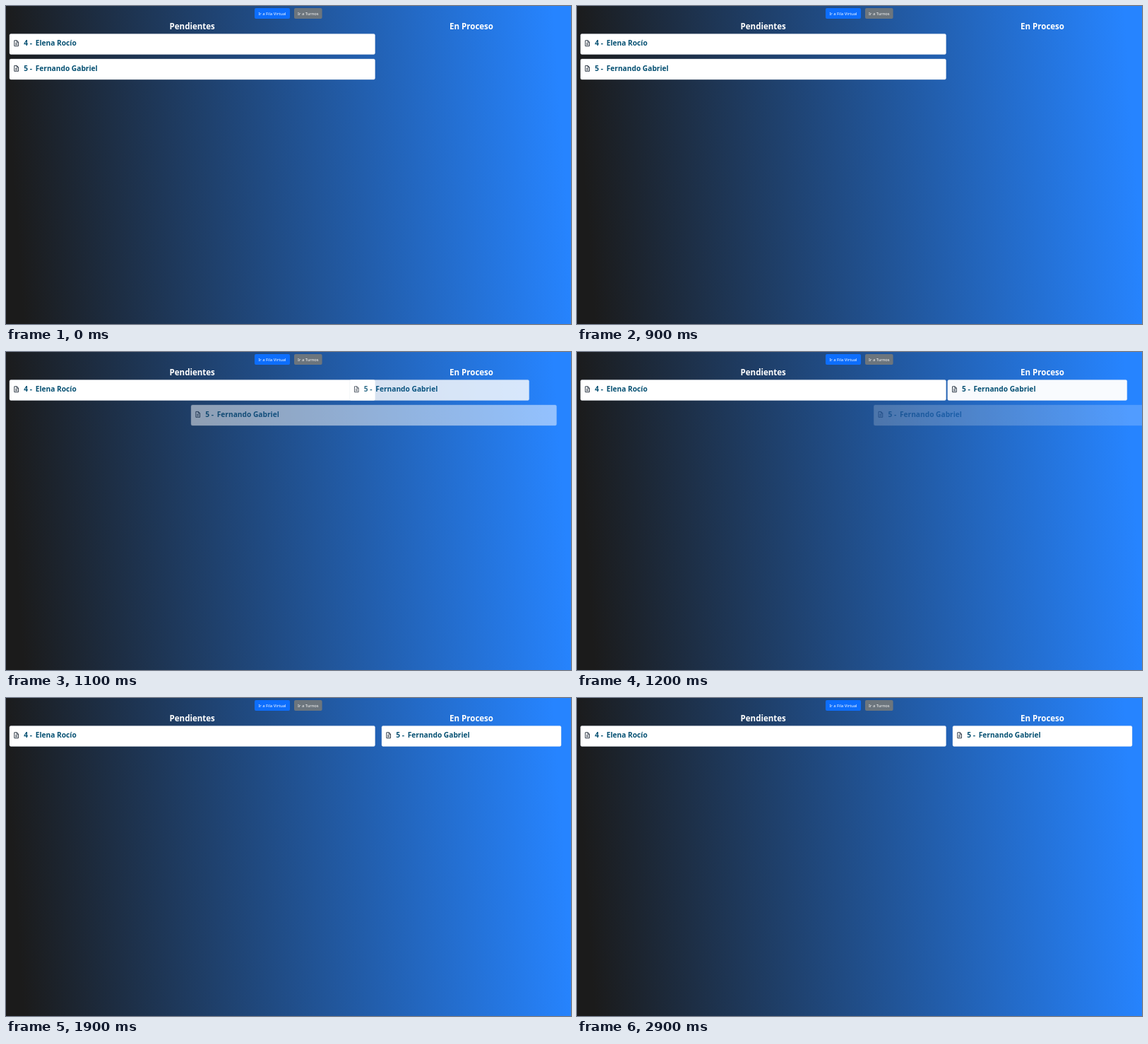
Recreate the animation shown at these times as an HTML page. Size 800 by 450 pixels, loop 3000 ms.

```html
<!DOCTYPE html>
<html lang="es">
<head>
<meta charset="utf-8">
<title>Turnos</title>
<style>
  html, body { margin: 0; width: 100%; height: 100%; overflow: hidden; }
  body { background: linear-gradient(86deg, #1b1b1b 3%, #2684ff 97%); }
  svg { display: block; width: 100%; height: 100%; }
  text { font-family: "Noto Sans", "Open Sans", sans-serif; }
  .head { font-size: 11.5px; font-weight: 600; fill: #fff; text-anchor: middle; }
  .btn { font-size: 5.8px; fill: #fff; text-anchor: middle; }
  .name { font-size: 10.2px; font-weight: 600; fill: #055072; }
  .box { fill: #fff; stroke: #dfe4ea; stroke-width: .4; }
  .icon { fill: none; stroke: #1c2936; stroke-width: .9; stroke-linejoin: round; }
</style>
</head>
<body>
<svg id="stage" viewBox="0 0 800 450"></svg>
<script>
const LOOP = 3000, STEP = 100;
const WIDE = 517.5, NARROW = 254;
const stage = document.getElementById('stage');

const button = (x, w, fill, label) => `
  <rect x="${x}" y="3" width="${w}" height="15" rx="2" fill="${fill}"/>
  <text class="btn" x="${x + w / 2}" y="13.1">${label}</text>`;

const heading = (x, label) => `<text class="head" x="${x}" y="33.3">${label}</text>`;

const card = (id, x, y, w, num, name) => `
  <g id="${id}"><g transform="translate(${x} ${y})">
    <rect class="box" width="${w}" height="29" rx="2"/>
    <path class="icon" d="M6.8 9.4h3.6l2.1 2.1v5.8h-5.7zM10.2 9.4v2.3h2.3M8.2 13.4h2.9M8.2 15.3h2.9"/>
    <text class="name" x="20.2" y="17.1">${num} -<tspan x="36.7">${name}</tspan></text>
  </g></g>`;

stage.innerHTML =
  button(352, 50, '#0d6efd', 'Ir a Fila Virtual') +
  button(408, 39.6, '#6c757d', 'Ir a Turnos') +
  heading(263.7, 'Pendientes') +
  heading(659, 'En Proceso') +
  card('first', 5, 39.4, WIDE, 4, 'Elena Rocío') +
  card('leaving', 5, 75, WIDE, 5, 'Fernando Gabriel') +
  card('entering', 532, 39.4, NARROW, 5, 'Fernando Gabriel');

const leaving = document.getElementById('leaving');
const entering = document.getElementById('entering');

// cubic-bezier(.25, .1, .25, 1), solved by bisection
const bez = (a, b, u) => 3 * a * u * (1 - u) ** 2 + 3 * b * u * u * (1 - u) + u ** 3;
function ease(x) {
  if (x <= 0) return 0;
  if (x >= 1) return 1;
  let lo = 0, hi = 1;
  for (let i = 0; i < 30; i++) {
    const mid = (lo + hi) / 2;
    if (bez(.25, .25, mid) < x) lo = mid; else hi = mid;
  }
  return bez(.1, 1, lo);
}

function pose(el, dx, opacity) {
  el.setAttribute('transform', `translate(${dx.toFixed(2)} 0)`);
  el.setAttribute('opacity', opacity.toFixed(3));
}

function draw(ms) {
  const t = Math.floor((ms % LOOP) / STEP) * STEP;
  const out = ease((t - 960) / 480);
  const into = ease((t - 904) / 377);
  pose(leaving, WIDE * out, 1 - out);
  pose(entering, NARROW * (into - 1), into);
}

const start = performance.now();
function tick() {
  draw(performance.now() - start);
  requestAnimationFrame(tick);
}
tick();
</script>
</body>
</html>
```
